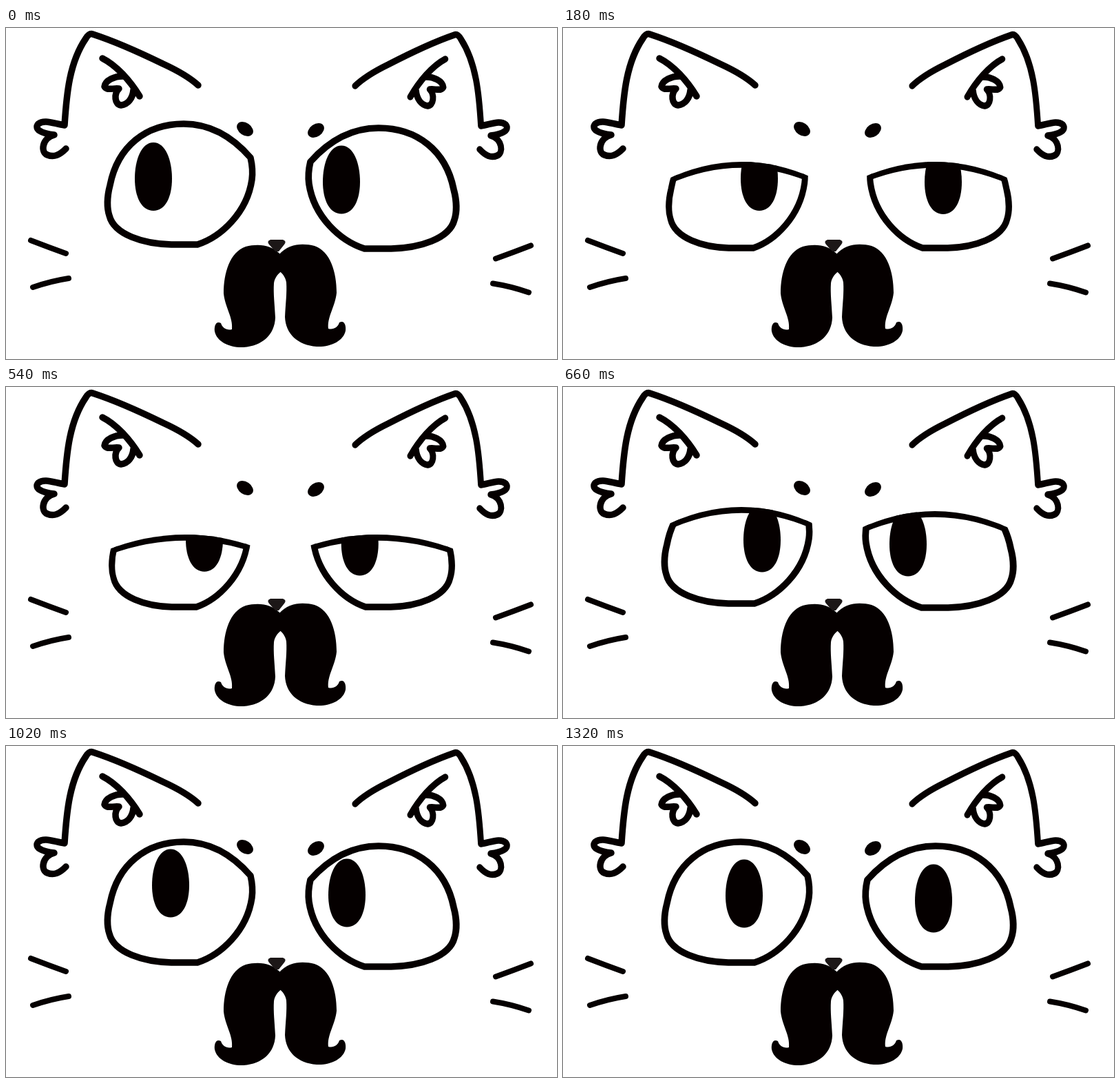
An HTML page with a canvas for the animation above (1.38 s loop, 800 px wide and 480 px high).

```html
<!DOCTYPE html>
<html lang="en">
<head>
<meta charset="utf-8">
<title>Blinking cat</title>
<style>
html, body { margin: 0; width: 100%; height: 100%; overflow: hidden; background: #fff; }
canvas { display: block; }
</style>
</head>
<body>
<canvas width="800" height="480"></canvas>
<script>
const ctx = document.querySelector('canvas').getContext('2d');
const INK = '#050000', LOOP = 1380, STEP = 60, LINE = 9.5;

// Left half of the face; the right half is mirrored from it
const earUp = 'M279 83 C268 73 252 63 228 52 C193 35 160 20 126 9 Q121 7 116 15 C92 50 88 95 85 141'
  + ' C70 139 56 132 47 139 C40 147 52 153 70 155 C52 160 50 180 60 184 C70 188 78 184 87 175'
  + ' M140 44 C160 54 180 76 194 99'
  + ' M172 70 C158 69 144 76 143 85 C146 91 155 87 164 88 C156 96 158 111 167 112 C177 111 184 102 185 90';
const earFolded = 'M251 82 C232 72 212 63 190 52 C166 40 143 28 121 16 Q118 15 114 21 C92 47 93 100 111 150'
  + ' C100 126 86 119 83 129 C83 136 91 139 101 138 C92 141 88 147 92 152 C98 154 106 150 111 147'
  + ' M128 63 C140 78 149 98 152 115'
  + ' M136 90 C125 86 117 92 121 98 C124 103 130 103 134 102 C122 106 120 116 128 121 C136 125 146 122 148 116';
const whiskers = 'M36 308 Q62 318 87 327 M39 376 Q65 367 91 363';
const nose = 'M384 307 H402 Q408 309 404 314 L396 324 H391 L382 314 Q378 309 384 307Z';
const moustache = 'M400 330 C385 313 365 313 348 317 C325 325 316 355 316 385 C318 405 330 420 328 437'
  + ' C321 439 314 435 312 428 C305 424 302 432 303 440 C306 455 325 464 345 463 C372 461 390 445 391 420'
  + ' C390 400 388 385 389 370 C390 362 396 355 400 353Z';
const eyeball = new Path2D('M355 188 C328 157 295 139 258 139 C203 139 162 172 151 228 C146 247 147 263 150 272'
  + ' C157 300 200 313 240 314 H278 C312 303 350 268 357 220 Q359 205 355 188Z');
const pupil = 'M0 -49.5 C17 -49.5 27 -25 27 3 C27 30 17 49.5 0 49.5 C-17 49.5 -27 30 -27 3 C-27 -25 -17 -49.5 0 -49.5Z';

// Time, left pupil x y, right pupil x y
const gaze = [
  [0, 214, 215.5, 487, 220], [180, 285, 215.5, 552, 220.5], [660, 289, 219, 501, 225],
  [900, 239, 197, 488, 213], [1140, 239, 201, 502, 213], [1320, 263, 214, 538, 221]
];

const clamp = v => Math.max(0, Math.min(1, v));

function gazeAt(t) {
  const i = Math.max(1, gaze.findIndex(key => key[0] >= t));
  const a = gaze[i - 1], b = gaze[i];
  return a.map((v, j) => v + (b[j] - v) * (t - a[0]) / (b[0] - a[0])).slice(1);
}

function mixPath(a, b, k) {
  const target = b.match(/\d+/g);
  let i = 0;
  return a.replace(/\d+/g, v => +v + (target[i++] - v) * k);
}

function stroke(d, width = LINE, color = INK) {
  ctx.lineWidth = width;
  ctx.strokeStyle = color;
  ctx.stroke(new Path2D(d));
}

function fill(d, color = INK) {
  ctx.fillStyle = color;
  ctx.fill(new Path2D(d));
}

// Draws once as is and once with x -> sum - scale * x, y -> y + dy
function bothSides(sum, scale, dy, paint) {
  paint();
  ctx.save();
  ctx.transform(-scale, 0, 0, 1, sum, dy);
  paint();
  ctx.restore();
}

function drawBrow() {
  ctx.fillStyle = INK;
  ctx.beginPath();
  ctx.ellipse(347, 146.5, 13, 9, 0.6, 0, Math.PI * 2);
  ctx.fill();
}

function lidCurve(y) {
  const end = y + 28 - (y - 178) / 4;
  return `M140 ${end + 2} Q255 ${2 * y - end} 370 ${end - 2}`;
}

// An eyeball cut off by a lid; a low lid also squeezes it
function drawEye(cx, scale, dy, lid, isOpen, px, py) {
  const squeeze = clamp((lid - 178) / 20);
  const y = lid - 5 * squeeze;
  ctx.save();
  const stage = ctx.getTransform();
  ctx.translate(cx, 5 * squeeze + dy * (1 - squeeze));
  ctx.scale(scale * (1 - 0.06 * squeeze), 1);
  ctx.translate(-252, 0);
  if (!isOpen) ctx.clip(new Path2D(lidCurve(y - 4) + 'V400 H140Z'));
  stroke(eyeball);
  ctx.clip(eyeball);
  if (!isOpen) stroke(lidCurve(y));
  ctx.setTransform(stage);
  ctx.translate(px, py);
  fill(pupil);
  ctx.restore();
}

function drawShutEye() {
  stroke('M166 278 C188 300 250 308 327 286', 12, '#2b2727');
  stroke('M178 286 C215 297 275 293 322 276', 12);
  stroke('M334 243 V258', 11, '#444040');
}

function draw(t) {
  ctx.fillStyle = '#fff';
  ctx.fillRect(0, 0, 800, 480);
  ctx.lineCap = ctx.lineJoin = 'round';

  const fold = clamp(1 - Math.abs(t - 1140) / 120);
  stroke(mixPath(earUp, earFolded, fold));
  ctx.save();
  ctx.transform(-0.942, 0, 0, 1, 769.7, 1);
  stroke(earUp);
  ctx.restore();
  bothSides(798, 1, 7.5, () => stroke(whiskers, 8));
  bothSides(797, 1, 2, drawBrow);

  // Time away from the closed moment; the lid moves at a steady speed
  const away = Math.max(360 - t, t - 420);
  if (away <= 0) {
    bothSides(794, 1, -2, drawShutEye);
  } else {
    const lid = 258 - away / 3, isOpen = away >= 360;
    const [lx, ly, rx, ry] = gazeAt(t);
    drawEye(252, 1, 0, isOpen ? 0 : lid, isOpen, lx, ly);
    drawEye(547, -1.02, 6, isOpen ? 0 : lid, isOpen, rx, ry);
  }

  bothSides(796, 1, -1, () => fill(moustache));
  fill(nose, '#1c1717');
}

function tick() {
  draw(Math.floor(performance.now() % LOOP / STEP) * STEP);
  requestAnimationFrame(tick);
}
tick();
</script>
</body>
</html>
```
